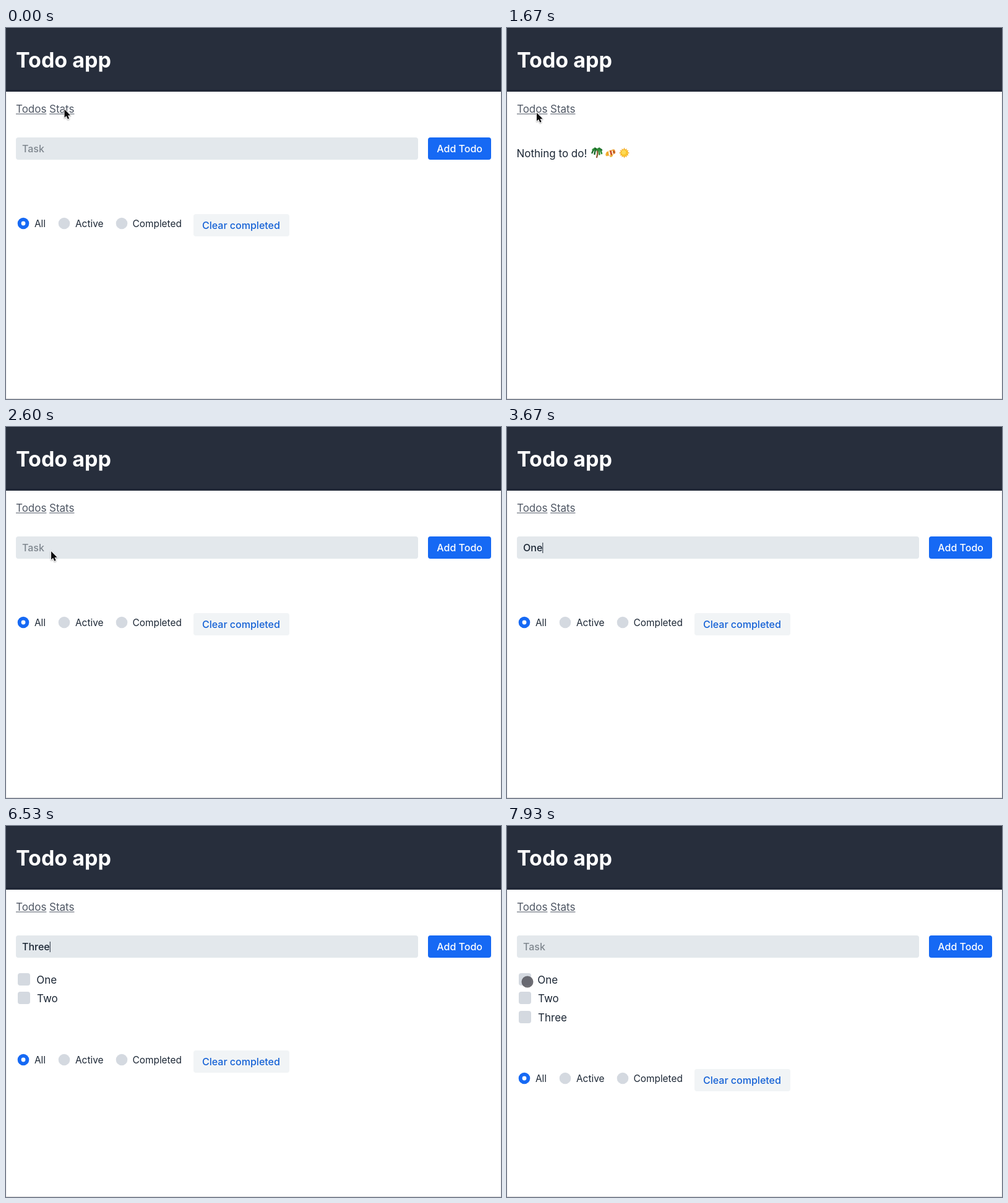
An HTML page with a canvas that plays this animation: 800x600 px, repeating every 8 s.

```html
<!DOCTYPE html>
<html lang="en">
<head>
<meta charset="utf-8">
<title>Todo app</title>
<style>
  html, body { margin: 0; width: 100%; height: 100%; overflow: hidden; background: #fff; }
  canvas { display: block; width: 800px; height: 600px; }
</style>
</head>
<body>
<canvas id="stage" width="800" height="600"></canvas>
<script>
const ctx = document.getElementById("stage").getContext("2d");
const LOOP = 8000, TICK = 1000 / 15;
const FAMILY = "Inter, 'Open Sans', sans-serif";
const INK = "#1b2634", BLUE = "#1669f4", GREY = "#d4d9e0";

// What the input holds from each moment on; null means not focused.
const typing = [
  [0, null], [3270, "O"], [3600, "On"], [3670, "One"],
  [4070, ""], [4470, "T"], [4730, "Tw"], [4870, "Two"],
  [5330, ""], [5730, "T"], [6070, "Th"], [6270, "Thr"], [6400, "Thre"], [6530, "Three"],
  [7070, ""], [7870, null]
];
const tasks = [[4070, "One"], [5330, "Two"], [7070, "Three"]];

// Pointer moves, in ticks: start, end, from, to.
const moves = [
  [19, 25, [94.5, 131.5], [48, 137]],
  [33, 39, [48, 137], [73, 201]],
  [40, 41, [73, 201], [73.5, 202]],
  [112, 117, [68.5, 202], [28.5, 246.5]]
];
const clicks = [[5, 9], [30, 33], [118, 121]];

function text(str, x, y, size, color = INK, weight = 400) {
  ctx.font = `${weight} ${size}px ${FAMILY}`;
  ctx.fillStyle = color;
  ctx.fillText(str, x, y);
  return ctx.measureText(str).width;
}

function rect(x, y, w, h, color, r = 0) {
  ctx.fillStyle = color;
  ctx.beginPath();
  ctx.roundRect(x, y, w, h, r);
  ctx.fill();
}

function oval(x, y, rx, ry, color, turn = 0) {
  ctx.fillStyle = color;
  ctx.beginPath();
  ctx.ellipse(x, y, rx, ry, turn, 0, Math.PI * 2);
  ctx.fill();
}

const dot = (x, y, r, color) => oval(x, y, r, r, color);

function link(str, x) {
  const w = text(str, x, 137, 17, "#4f5764");
  rect(x, 138.5, w, 1, "#4f5764");
}

function frame() {
  rect(0, 0, 800, 600, "#fff");
  rect(0, 103, 1, 497, "#f1f1f2");
  rect(799, 103, 1, 497, "#f1f1f2");
  rect(0, 599, 800, 1, "#d9d9da");
  rect(0, 0, 800, 103, "#272e3c");
  rect(0, 0, 800, 1, "#1f2632");
  rect(0, 99, 800, 4, "#222938");
  text("Todo app", 16, 64, 34, "#fff", 700);
  link("Todos", 16);
  link("Stats", 70);
}

function palm(x, y) {
  ctx.lineCap = "round";
  ctx.strokeStyle = "#8d5b35";
  ctx.lineWidth = 2.4;
  ctx.beginPath();
  ctx.moveTo(x - 0.5, y + 7);
  ctx.quadraticCurveTo(x + 1.8, y + 1, x, y - 5);
  ctx.stroke();
  ctx.lineWidth = 2.5;
  [[-8, 0], [-7, -5], [-3.5, -7.5], [4, -7.5], [7.5, -4.5], [7.5, 1], [-4, 2], [4, 2.5]].forEach(([dx, dy], i) => {
    ctx.strokeStyle = i % 2 ? "#2f8f37" : "#1d6b2b";
    ctx.beginPath();
    ctx.moveTo(x, y - 5);
    ctx.quadraticCurveTo(x + dx * 0.7, y - 8, x + dx, y + dy);
    ctx.stroke();
  });
}

function fish(x, y) {
  oval(x + 3.5, y - 3, 3.6, 2.4, "#e9a02b", -0.4);
  oval(x - 5.5, y + 1.5, 2.4, 3.8, "#f0b434", 0.3);
  oval(x, y + 0.5, 6, 4.6, "#f3a32c", -0.3);
  oval(x - 2, y + 1, 1.3, 4.3, "#fff3e2", -0.2);
  oval(x + 0.8, y, 1.3, 4.4, "#c8452c", -0.2);
  oval(x + 3, y - 0.5, 1.1, 3.6, "#fff3e2", -0.2);
  oval(x + 5.6, y - 1.5, 2, 3, "#e2762a", -0.2);
  dot(x + 5.2, y - 1.5, 0.8, "#33251d");
  oval(x + 1, y + 5, 2.5, 1.5, "#e9b23c", -0.4);
}

function sun(x, y) {
  ctx.fillStyle = "#f4a91f";
  ctx.beginPath();
  for (let i = 0; i < 24; i++) {
    const a = i * Math.PI / 12, r = i % 2 ? 5.5 : (i % 6 ? 8 : 8.7);
    ctx.lineTo(x + r * Math.cos(a), y + r * Math.sin(a));
  }
  ctx.fill();
  dot(x, y, 5.6, "#fbc62f");
  dot(x - 0.8, y - 1, 3.5, "#fdd956");
}

function statsPage() {
  text("Nothing to do!", 15.5, 209, 17);
  palm(145.5, 202);
  fish(167.5, 202);
  sun(189.5, 202);
}

function radio(x, y, label, labelX, on) {
  dot(x, y, 9.3, on ? BLUE : GREY);
  if (on) dot(x, y, 3.4, "#fff");
  text(label, labelX, y + 6, 15.4);
}

function todoPage(t) {
  rect(16, 177, 650, 36, "#e3e8ec", 4);
  rect(682, 177, 102, 36, BLUE, 4);
  text("Add Todo", 696.3, 201, 16, "#fff", 500);

  const value = typing.findLast(step => t >= step[0])[1];
  if (value) {
    const w = text(value, 26, 201, 16, INK, 500);
    rect(26 + w, 187, 1, 17, INK);
  } else {
    text("Task", 26, 201, 16, "#7f878f", 500);
    if (value === "") rect(26, 187, 1, 17, INK);
  }

  const shown = tasks.filter(task => t >= task[0]);
  shown.forEach(([, name], i) => {
    const y = Math.round(238 + 30.4 * i);
    rect(19, y, 20, 20, GREY, 4);
    text(name, name === "One" ? 49.2 : 50, y + 17, 17);
  });

  const y = 316 + Math.round(30.8 * shown.length);
  radio(28, y, "All", 46, true);
  radio(94, y, "Active", 112, false);
  radio(187, y, "Completed", 204.5, false);
  rect(303, y - 15, 155, 36, "#f1f4f6", 4);
  text("Clear completed", 317, y + 9, 16, "#1461d6", 500);
}

function pointerAt(tick) {
  const [from, to, a, b] = moves.findLast(m => tick >= m[0]) || moves[0];
  const p = Math.min(1, Math.max(0, (tick - from) / (to - from)));
  const e = p * p * (3 - 2 * p);
  return a.map((v, i) => v + (b[i] - v) * e);
}

function arrow(x, y) {
  ctx.save();
  ctx.translate(x, y);
  ctx.beginPath();
  [[0, 0], [0, 13.6], [3.1, 10.8], [5.3, 15.8], [7.6, 14.8], [5.5, 9.9], [9.6, 9.7]]
    .forEach(([px, py]) => ctx.lineTo(px, py));
  ctx.closePath();
  ctx.lineJoin = "round";
  ctx.strokeStyle = "#fff";
  ctx.lineWidth = 1.8;
  ctx.shadowColor = "rgba(0,0,0,.35)";
  ctx.shadowBlur = 2;
  ctx.shadowOffsetY = 1;
  ctx.stroke();
  ctx.shadowColor = "transparent";
  ctx.fillStyle = "#0c0c0e";
  ctx.fill();
  ctx.restore();
}

function pointer(t, tick) {
  if (t >= 3270 && tick < 113) return;
  const [x, y] = pointerAt(tick);
  const click = clicks.find(([a, b]) => tick >= a && tick < b);
  if (!click) return arrow(x, y);
  const r = tick === click[0] ? 7.5 : 9;
  dot(x + 4.5, y + 5.5, r, "rgba(80,80,88,.82)");
  ctx.strokeStyle = "rgba(70,70,76,.6)";
  ctx.lineWidth = 1.2;
  ctx.stroke();
}

function draw(now) {
  const t = now % LOOP;
  const tick = Math.floor((t + 4) / TICK);
  frame();
  if (tick >= 7 && tick < 32) statsPage();
  else todoPage(t);
  pointer(t, tick);
}

const start = performance.now();
function run() {
  draw(performance.now() - start);
  requestAnimationFrame(run);
}
run();
</script>
</body>
</html>
```
